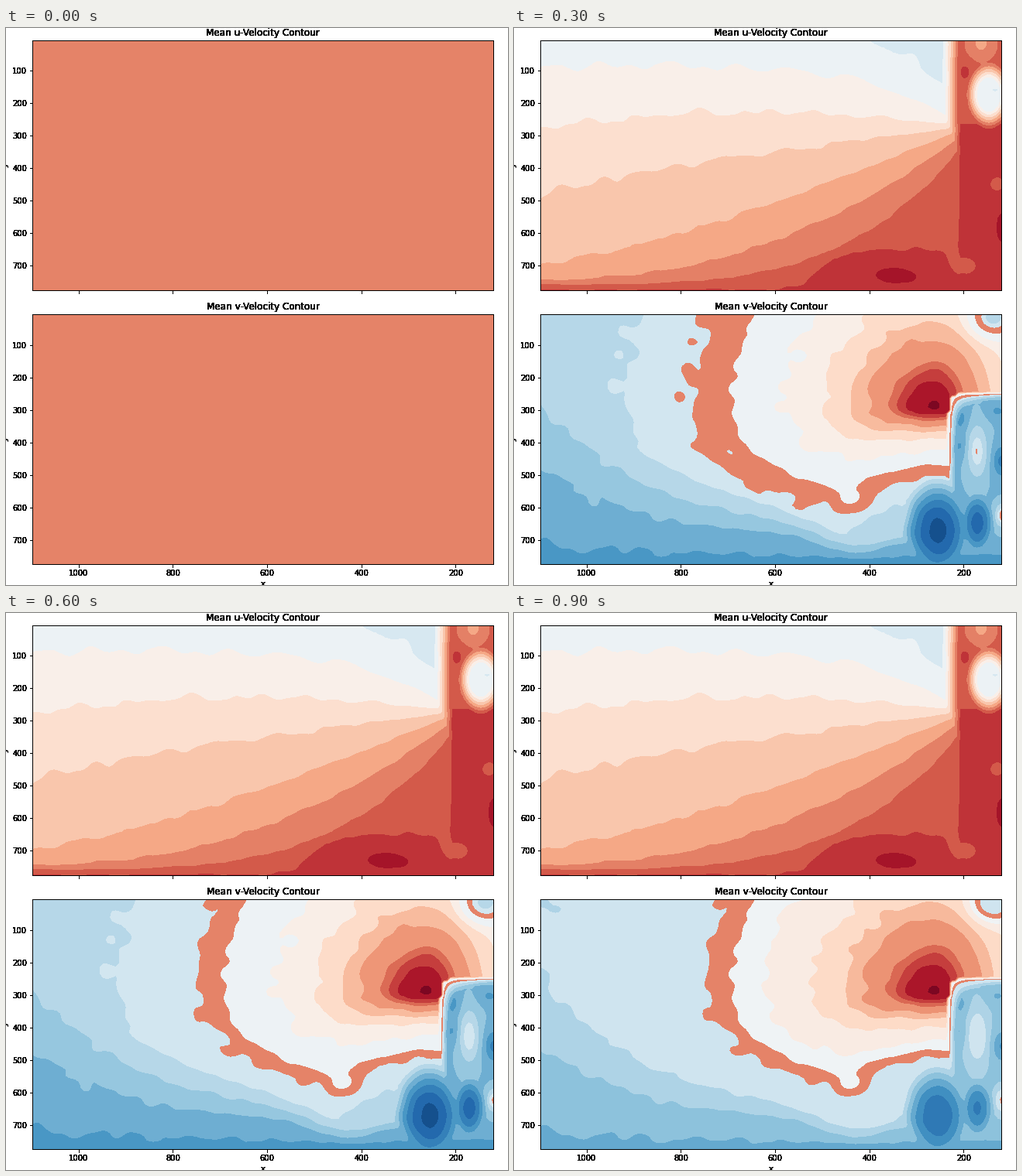
Write a matplotlib script that moves like this. It is 648 px wide and 720 px high and loops after 1 s.

```python
import numpy as np
import matplotlib.pyplot as plt
from matplotlib.animation import FuncAnimation

W, H, FRAMES = 648, 720, 10
LEFT, RIGHT = 34, 629
U_SPAN, V_SPAN = (16, 339), (370, 693)   # top and bottom of each panel
SALMON = "#e58368"
CMAP = plt.get_cmap("RdBu_r")


def mesh(span):
    return np.meshgrid(np.linspace(LEFT, RIGHT, 150), np.linspace(*span, 82))


def blob(x, y, cx, cy, sx, sy, height):
    return height * np.exp(-(((x - cx) / sx) ** 2 + ((y - cy) / sy) ** 2) / 2)


def ripple(x, y, size, seed):
    """Smooth seeded noise that fades out towards the wake on the right."""
    rng = np.random.default_rng(seed)
    total = np.zeros_like(x)
    for _ in range(24):
        angle, phase = rng.uniform(0, 2 * np.pi, 2)
        k = 2 * np.pi / rng.uniform(22, 70)
        total += np.sin(k * (x * np.cos(angle) + y * np.sin(angle)) + phase)
    return size * total / np.sqrt(12) * np.clip((575 - x) / 60, 0.1, 1)


def u_field():
    x, y = mesh(U_SPAN)
    xs = x[0]
    s = np.clip((xs - LEFT) / 516, 0, 1.04)

    # Height of each contour: start, end and how late it bends upwards.
    bends = [(-40, 70, 3.4), (50, 110, 5), (130, 124, 1), (222, 132, 0.7),
             (307, 143, 1.3), (327, 160, 2.2), (332, 185, 3.8)]
    curves = [a + (b - a) * s ** p for a, b, p in bends]
    curves[2] -= 18 * np.sin(np.pi * np.minimum(s, 1))
    floor = 337 - 48 / (1 + np.exp((395 - xs) / 14))
    curves = [curves[0] - 150, *curves, floor, floor + 120]
    curves = np.maximum.accumulate(curves)
    z = np.array([np.interp(y[:, i], curves[:, i], range(10))
                  for i in range(len(xs))]).T

    # Fast column on the right, with a slow bubble inside it.
    cap = 7.3 + 1.1 / (1 + np.exp((122 - y) / 4))
    z = np.maximum(z, np.minimum(2 + (x - 558) / 3, cap))
    z += blob(x, y, 603, 20, 12, 14, -1.6) + blob(x, y, 582, 57, 6, 9, 1)
    r = np.hypot((x - 613) / 16, (y - 86) / 23)
    z = np.minimum(z, np.maximum(1.15, 2 + 6.5 * (r - 1)))
    z += blob(x, y, 621, 81, 5, 2, -0.3)

    z += blob(x, y, 492, 319, 37, 12, 1) + blob(x, y, 629, 258, 6, 20, 0.9)
    z += blob(x, y, 582, 308, 14, 11, -0.7) + blob(x, y, 624, 202, 9, 9, -0.7)
    return x, y, z + ripple(x, y, 0.035, 4)


def v_field():
    x, y = mesh(V_SPAN)

    # Positive lobe, squeezed below its centre and to its right.
    dx, dy = x - 543, y - 490
    squeeze = 2.1 + 1.4 * np.exp(-(dx / 90) ** 2)
    r = np.hypot(np.where(dx > 0, 1.5 * dx, dx),
                 np.where(dy > 0, squeeze * dy, dy))
    radii = [0, 8, 36, 48, 60, 93, 115, 155, 220, 262, 290, 400, 520]
    z = np.interp(r, radii, [8.8, *range(8, -4, -1)])

    # Layer along the floor, thinner towards the right.
    base = 660 - 75 * np.exp((LEFT - x) / 100) + blob(x, y, 440, y, 45, 1, 22)
    thick = 120 * np.exp((LEFT - x) / 200)
    above = -5 - 2 * (y - base) / thick
    below = -5 - 1.2 * (y - base) / (687 - base)
    z = np.minimum(z, np.where(y < base, above, below))
    z += blob(x, y, 434, 608, 14, 11, 1.5) + blob(x, y, 617, 375, 20, 17, -4.5)

    # Sharp corner-shaped front that bounds the wake.
    a, b = np.maximum(x - 557, 0.01), np.maximum(y - 467, 0.01)
    front = 1 / (a ** -0.5 + b ** -0.5) ** 2
    inside = np.maximum(-1.5 * (front - 3), -4.7)
    z = np.where(front > 2.2, np.minimum(z, inside), z)
    for cx, cy, rx, ry, depth in ((547, 650, 15, 21, -10.4),
                                  (598, 640, 9, 16, -9.3)):
        ring = np.hypot((x - cx) / rx, (y - cy) / ry)
        z = np.minimum(z, depth + 0.9 * ring ** 1.9)
    z += blob(x, y, 577, 505, 7, 12, -1.7) + blob(x, y, 576, 541, 6, 12, -1.5)
    z += blob(x, y, 598, 547, 9, 24, 3.5) + blob(x, y, 629, 560, 8, 14, -3)
    z += blob(x, y, 629, 630, 5, 10, 4) + blob(x, y, 624, 495, 10, 8, -1.5)
    return x, y, z + ripple(x, y, 0.1, 11)


def scheme(low, tints, high, shades, cold_count, white):
    """Contour bounds and colours below and above the zero band."""
    return (np.linspace(*low, cold_count - 1),
            CMAP(np.linspace(*tints, cold_count)),
            np.linspace(*high, 8),
            CMAP([white, *np.linspace(*shades, 8)]))


COARSE = scheme((-9.2, -4), (0.07, 0.345), (2, 8), (0.57, 0.94), 7, 0.475)
EVEN = scheme((-10.4, -3), (0.09, 0.395), (1, 8), (0.54, 0.97), 7, 0.48)
FINE = scheme((-9.8, -2), (0.06, 0.405), (1.4, 8), (0.535, 0.97), 8, 0.475)
SCHEMES = [None, COARSE, EVEN, FINE, FINE, FINE, FINE, EVEN, EVEN, EVEN]

fig = plt.figure(figsize=(W / 72, H / 72), dpi=72, facecolor="white")


def place(span):
    top, bottom = span
    return fig.add_axes([LEFT / W, 1 - bottom / H,
                         (RIGHT - LEFT) / W, (bottom - top) / H])


def canvas(span):
    ax = place(span)
    ax.set(xlim=(LEFT, RIGHT), ylim=span[::-1],
           xticks=[], yticks=[], facecolor=SALMON)
    return ax


def decorate(span, name, ylim, bottom):
    # Stacked copies give the text its heavy edges.
    for _ in range(12):
        ax = place(span)
        ax.patch.set_visible(False)
        ax.set(xlim=(1098, 120), ylim=ylim, ylabel="y",
               xticks=range(1000, 0, -200), yticks=range(100, 701, 100))
        ax.set_title(f"Mean {name}-Velocity Contour", fontsize=12)
        if bottom:
            ax.set_xlabel("x")
        else:
            ax.tick_params(labelbottom=False)


u_ax, v_ax = canvas(U_SPAN), canvas(V_SPAN)
decorate(U_SPAN, "u", (776, 7), False)
decorate(V_SPAN, "v", (774, 5), True)
u, v = u_field(), v_field()


def fill(ax, field, bounds, colors):
    ax.contourf(*field, levels=[-99, *bounds, 99], colors=colors)


def update(n):
    for ax in (u_ax, v_ax):
        for artist in list(ax.collections):
            artist.remove()
    if n == 0:
        return
    tones = [CMAP((k + 0.5) / 18) for k in range(7, 17)]
    if n == 1:
        tones[0] = SALMON
    fill(u_ax, u, range(1, 10), tones)

    # The band just below zero narrows as the mean settles.
    low, cold, high, warm = SCHEMES[n]
    gap = -1 - 2.0 ** (1 - n)
    fill(v_ax, v, [*low, gap, 0, *high], [*cold, SALMON, *warm])


anim = FuncAnimation(fig, update, frames=FRAMES, interval=100,
                     init_func=lambda: update(0), repeat=True,
                     repeat_delay=0, blit=False)
plt.show()
```
